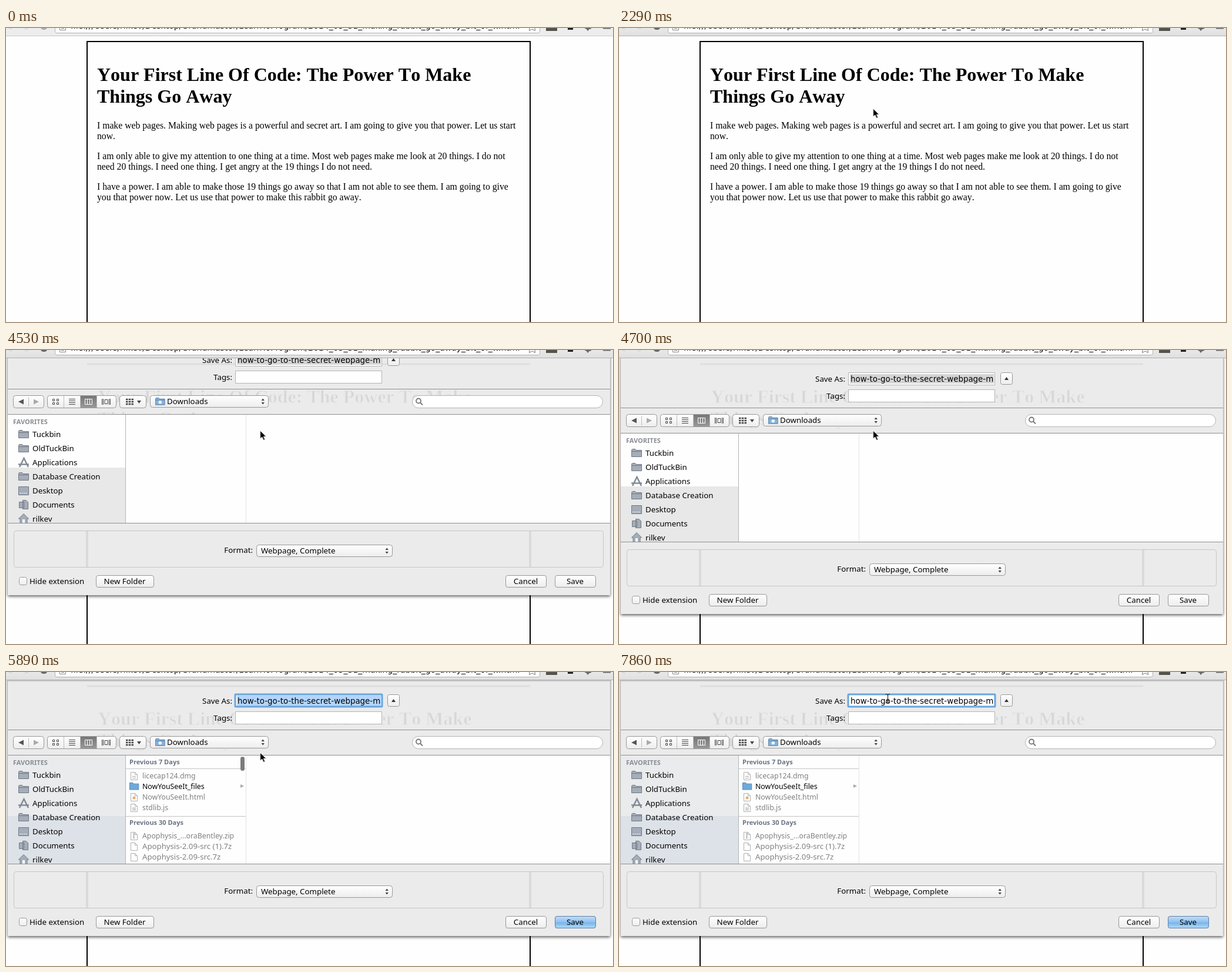
An HTML page that plays this animation: 1033 by 500 pixels, repeating every 8 s.

```html
<!DOCTYPE html>
<html lang="en">
<head>
<meta charset="utf-8">
<title>Saving a web page</title>
<style>
html, body { margin: 0; width: 100%; height: 100%; overflow: hidden; background: #fefefe; }
svg { display: block; width: 1033px; height: 500px; }
text { font: 13.3px "Noto Sans", "Open Sans", sans-serif; white-space: pre; }
.end { text-anchor: end; }
.mid { text-anchor: middle; }
.page text, .ghost text { font: 15.72px "Liberation Serif", "Times New Roman", serif; font-kerning: none; }
.page .h1, .ghost .h1 { font-size: 32px; font-weight: bold; }
.url { font: 14px "DejaVu Sans", sans-serif; }
.name { font: 13.4px "DejaVu Sans", sans-serif; }
.cap { font-size: 11px; font-weight: bold; fill: #8a8d92; }
.group { font-size: 11px; font-weight: bold; fill: #6b7482; }
.file { font-size: 12.3px; fill: #808080; }
.wide { font-size: 13.2px; }
.btn { fill: url(#face); stroke: #989898; }
.field { fill: #fff; stroke: #b4b4b4; }
.rule { stroke: #8f8f8f; }
.thin { stroke: #c4c4c4; }
.ico { fill: #a4adb8; stroke: #6f7883; }
.doc { fill: #fff; stroke: #b0b0b0; }
.ghost { fill: #d5d7d8; stroke: #ebebeb; }

/* one 8 s clock, hard cuts only */
.sheet, .ghost, .idle, .active, .list, .knob, .pulse, .sel, .caret, .arrow, .beam, .lit {
  animation: 8s step-end infinite;
}
.lit { animation-name: lit; }
.sheet { animation-name: sheet; }
.ghost { animation-name: ghost; }
.idle { animation-name: idle; }
.active { animation-name: active; }
.list { animation-name: list; }
.knob { animation-name: knob; }
.pulse { animation-name: pulse; }
.sel { animation-name: sel; }
.caret { animation-name: caret; }
.arrow { animation-name: arrow; }
.beam { animation-name: beam; }
@keyframes lit { 0% { opacity: 0 } 1.75%, 100% { opacity: 1 } }
@keyframes sheet {
  0% { transform: translateY(-480px) }
  54.75% { transform: translateY(-327px) }
  56.625% { transform: translateY(-32px) }
  58.75%, 100% { transform: none }
}
@keyframes ghost {
  0% { transform: translateY(480px) }
  54.75% { transform: translateY(327px) }
  56.625% { transform: translateY(32px) }
  58.75%, 100% { transform: none }
}
@keyframes idle { 0% { opacity: 1 } 61.75%, 100% { opacity: 0 } }
@keyframes active { 0% { opacity: 0 } 61.75%, 100% { opacity: 1 } }
@keyframes list { 0% { opacity: 0 } 66.125%, 100% { opacity: 1 } }
@keyframes knob {
  0% { opacity: 0 } 69.125% { opacity: .4 } 70.875% { opacity: .75 } 73.625% { opacity: 1 }
  79.375% { opacity: .6 } 81% { opacity: .3 } 82.5%, 100% { opacity: 0 }
}
@keyframes pulse {
  0% { opacity: 0 } 66.125% { opacity: .12 } 69.125% { opacity: .25 } 70.875% { opacity: .12 }
  73.625% { opacity: 0 } 75.75% { opacity: .1 } 79.375% { opacity: .22 } 82.5% { opacity: .1 }
  84.75% { opacity: 0 } 87.25% { opacity: .1 } 89.125% { opacity: .2 } 92.875% { opacity: .25 }
  94.625% { opacity: .12 } 98.25%, 100% { opacity: 0 }
}
@keyframes sel { 0% { opacity: 1 } 87.25%, 100% { opacity: 0 } }
@keyframes caret { 0% { opacity: 0 } 87.25% { opacity: 1 } 92.875%, 100% { opacity: 0 } }
@keyframes arrow {
  0% { transform: translate(433px, 40px); opacity: 0 }
  25% { transform: translate(433px, 40px); opacity: 1 }
  26.75% { transform: translate(430px, 135px); opacity: 1 }
  28.625% { transform: translate(432.5px, 137px); opacity: 1 }
  77.5% { transform: translate(449px, 95px); opacity: 1 }
  79.375% { transform: translate(456px, 62px); opacity: 1 }
  81%, 100% { opacity: 0 }
}
@keyframes beam {
  0% { opacity: 0 }
  81% { transform: translate(458px, 50px); opacity: 1 }
  82.5% { transform: translate(456px, 47px); opacity: 1 }
  84.75% { transform: translate(453px, 41px); opacity: 1 }
  87.25%, 100% { transform: translate(457px, 45px); opacity: 1 }
}
</style>
</head>
<body>
<svg viewBox="0 0 1033 500">
  <defs>
    <linearGradient id="face" x2="0" y2="1"><stop stop-color="#fff"/><stop offset="1" stop-color="#ededed"/></linearGradient>
    <linearGradient id="blue" x2="0" y2="1"><stop stop-color="#c3def6"/><stop offset=".5" stop-color="#8fc0ee"/><stop offset=".52" stop-color="#75b1ea"/><stop offset="1" stop-color="#aeddfb"/></linearGradient>
    <linearGradient id="dark" x2="0" y2="1"><stop stop-color="#777"/><stop offset="1" stop-color="#989898"/></linearGradient>
    <linearGradient id="bar" x2="0" y2="1"><stop stop-color="#e8e8e8"/><stop offset="1" stop-color="#e0e0e0"/></linearGradient>
    <linearGradient id="top" x2="0" y2="1"><stop stop-color="#000" stop-opacity=".22"/><stop offset="1" stop-color="#000" stop-opacity="0"/></linearGradient>
    <filter id="blur" x="-5%" y="-5%" width="110%" height="110%"><feGaussianBlur stdDeviation="2.5"/></filter>
    <clipPath id="below"><path d="M0 13.5H1033V500H0z"/></clipPath>
    <clipPath id="sheetBox"><path d="M3 13H1028V449H3z"/></clipPath>
    <clipPath id="listBox"><path d="M3 142H1028V326H3z"/></clipPath>
    <clipPath id="nameBox"><path d="M391 39H638V59H391z"/></clipPath>
    <path id="folder" class="ico" d="M.5 3.5Q.5 1.5 2.5 1.5H6.5L8 3.5H17.5V14.5H.5zM.5 5.5H17.5"/>
    <path id="sheetIcon" class="doc" d="M.5.5H7.5L11.5 4.5V13.5H.5zM7.5.5V4.5H11.5"/>
    <path id="updown" d="M0-1.5 2.7-5 5.4-1.5zM0 1.5 2.7 5 5.4 1.5z" fill="#444"/>
  </defs>

  <g class="page">
    <path d="M138 500V23H892V500" fill="none" stroke="#000" stroke-width="2"/>
    <text class="h1" x="155" y="90">Your First Line Of Code: The Power To Make</text>
    <text class="h1" x="155" y="127">Things Go Away</text>
    <text x="155" y="171">I make web pages. Making web pages is a powerful and secret art. I am going to give you that power. Let us start</text>
    <text x="155" y="189">now.</text>
    <text x="155" y="223">I am only able to give my attention to one thing at a time. Most web pages make me look at 20 things. I do not</text>
    <text x="155" y="241">need 20 things. I need one thing. I get angry at the 19 things I do not need.</text>
    <text x="155" y="275">I have a power. I am able to make those 19 things go away so that I am not able to see them. I am going to give</text>
    <text x="155" y="293">you that power now. Let us use that power to make this rabbit go away.</text>
  </g>

  <g clip-path="url(#below)">
    <g class="sheet">
      <path d="M3 0H1028V451H3z" fill="#000" opacity=".65" filter="url(#blur)"/>
      <path d="M3 0H1028V449H3z" fill="#ebebeb"/>
      <g clip-path="url(#sheetBox)">
        <g class="ghost">
          <path d="M138 24H892" style="stroke:#dedede;stroke-width:3"/>
          <text class="h1" x="156" y="90">Your First Line Of Code: The Power To Make</text>
          <text class="h1" x="156" y="127">Things Go Away</text>
        </g>
      </g>

      <!-- name and tags -->
      <text class="end" x="385" y="54">Save As:</text>
      <text class="end" x="385" y="83">Tags:</text>
      <path class="field" d="M390.500 38.500H639.500V59.500H390.500zM390.500 67.500H639.500V88.500H390.500z"/>
      <path class="idle" d="M393 41H638V57H393z" fill="#d4d4d4"/>
      <g class="active">
        <path class="sel" d="M393 40H638V58H393z" fill="#b3d5fb"/>
        <rect x="390" y="38" width="250" height="21" rx="1" fill="none" stroke="#69a5dd" stroke-width="3"/>
      </g>
      <text class="name" x="394" y="54" clip-path="url(#nameBox)">how-to-go-to-the-secret-webpage-make</text>
      <path class="caret" d="M457.500 41V57" stroke="#000"/>
      <rect class="btn" x="649.500" y="38.500" width="20" height="20" rx="3"/>
      <path d="M656 51 659.500 46 663 51z" fill="#333"/>

      <!-- browser strip -->
      <path class="rule" d="M3 98.500H1028M3 141.500H1028M3 326.500H1028"/>
      <g class="btn">
        <rect x="12.500" y="109.500" width="52" height="21" rx="4"/>
        <rect x="70.500" y="109.500" width="117" height="21" rx="4"/>
        <rect x="193.500" y="109.500" width="45" height="21" rx="4"/>
        <rect x="245.500" y="109.500" width="201" height="20" rx="4"/>
      </g>
      <path d="M127 110H154V130H127z" fill="url(#dark)"/>
      <path d="M38.500 112V128M98.500 110V130M126.500 110V130M154.500 110V130" stroke="#bbb"/>
      <path d="M30 115.500V124.500L21 120z" fill="#555"/>
      <path d="M47 115.500V124.500L56 120z" fill="#aaa"/>
      <g fill="none" stroke="#444">
        <path d="M79.500 115.500h3v3h-3zM86.500 115.500h3v3h-3zM79.500 121.500h3v3h-3zM86.500 121.500h3v3h-3z"/>
        <path d="M107 115.500H118M107 118.500H118M107 121.500H118M107 124.500H118"/>
        <path d="M134.500 115.500H146.500V124.500H134.500zM138.500 115V125M142.500 115V125" stroke="#fff"/>
        <path d="M163.500 115V125M165.500 115V125M175.500 115V125M177.500 115V125M168 116.500H173V123.500H168z"/>
        <path d="M204 116H217M204 120H217M204 124H217" stroke-width="2.500" stroke-dasharray="3.500 1.250"/>
      </g>
      <path d="M223 118H230L226.500 123z" fill="#444"/>
      <g transform="translate(254 112) scale(.92)"><use href="#folder" style="filter:hue-rotate(-5deg) saturate(4)"/><circle cx="9" cy="9.500" r="3" fill="#edf6fc"/></g>
      <text x="274" y="124">Downloads</text>
      <use href="#updown" x="434.500" y="119.500"/>
      <rect class="field" x="691.500" y="109.500" width="324" height="21" rx="10.500"/>
      <g fill="none" stroke="#777" stroke-width="1.800"><circle cx="702" cy="118.500" r="4"/><path d="M705 121.500 709 125.500"/></g>

      <!-- columns -->
      <g clip-path="url(#listBox)">
        <path d="M3 142H1028V326H3z" fill="#fefefe"/>
        <path d="M3 232H203V326H3z" fill="#e8e8e8"/>
        <g class="active">
          <path d="M3 142H203V245H3z" fill="#e9ebed"/>
          <path d="M3 245H203V326H3z" fill="#dde2e8"/>
        </g>
        <path d="M203.500 142V326" stroke="#b4b4b4"/>
        <path d="M408.500 142V326" stroke="#e4e4e4"/>
        <text class="cap" x="12" y="158">FAVORITES</text>
        <use href="#folder" x="21" y="167"/><text x="45" y="180">Tuckbin</text>
        <use href="#folder" x="21" y="191"/><text x="45" y="204">OldTuckBin</text>
        <path d="M23 231 30.500 216 38 231M21 226.500H39" fill="none" stroke="#828b96" stroke-width="2.500"/><text x="45" y="228">Applications</text>
        <use href="#folder" x="21" y="239"/><text x="45" y="252">Database Creation</text>
        <path class="ico" d="M21.500 264.500H38.500V278.500H21.500z"/><path d="M23 275.500H37" stroke="#fff" stroke-dasharray="2 1.500"/><text x="45" y="276">Desktop</text>
        <path class="ico" d="M22.500 290.500H30.500V300.500H22.500zM28.500 287.500H34L37.500 291V302.500H28.500z"/><text x="45" y="300">Documents</text>
        <path class="ico" d="M21.500 319 30 310.500 38.500 319H36V327H24V319z"/><path d="M28 320H32V327H28z" fill="#fff"/><text x="45" y="324">rilkev</text>

        <g class="list">
          <path class="thin" d="M204 164.500H408M204 245.500H408"/>
          <text class="group" x="210" y="157">Previous 7 Days</text>
          <text class="group" x="210" y="260">Previous 30 Days</text>
          <use href="#sheetIcon" x="212" y="170"/><path d="M215 177.500H221M215 180.500H221" stroke="#aaa"/>
          <g transform="translate(210 187) scale(.9)"><path d="M.5 1.500H6.500L8 3.500H17.500V14.500H.5z" fill="#6fa9d8" stroke="#4e87b6"/></g>
          <use href="#sheetIcon" x="212" y="206"/><circle cx="218" cy="214" r="2.500" fill="#e0b070"/>
          <use href="#sheetIcon" x="212" y="224"/><path d="M215 231.500H221M215 234.500H221" stroke="#888"/>
          <use href="#sheetIcon" x="212" y="272"/><path d="M217.500 274V284" stroke="#888" stroke-width="2" stroke-dasharray="1.500 1"/>
          <use href="#sheetIcon" x="212" y="290"/>
          <use href="#sheetIcon" x="212" y="308"/>
          <text class="file" x="232" y="181">licecap124.dmg</text>
          <text class="file" x="232" y="199" style="fill:#000">NowYouSeeIt_files</text>
          <text class="file" x="232" y="217">NowYouSeeIt.html</text>
          <text class="file" x="232" y="235">stdlib.js</text>
          <text class="file" x="232" y="283">Apophysis_...oraBentley.zip</text>
          <text class="file wide" x="232" y="301">Apophysis-2.09-src (1).7z</text>
          <text class="file wide" x="232" y="319">Apophysis-2.09-src.7z</text>
          <path d="M399 191 405 194 399 197z" fill="#aaa"/>
        </g>
        <rect class="knob" x="399" y="144" width="7" height="24" rx="3.500" fill="#7c7c7c"/>
      </g>

      <!-- format and buttons -->
      <path d="M138 339V402M892 339V402" stroke="#dadada" stroke-width="4"/>
      <rect x="13.500" y="339.500" width="1003" height="62" rx="4" fill="none" stroke="#c6c6c6"/>
      <text class="end" x="420" y="377">Format:</text>
      <g class="btn">
        <rect x="426.500" y="363.500" width="231" height="20" rx="4"/>
        <rect x="22.500" y="418.500" width="13" height="13" rx="3"/>
        <rect x="153.500" y="415.500" width="98" height="20" rx="3.500"/>
        <rect x="850.500" y="415.500" width="69" height="20" rx="3.500"/>
        <rect x="934.500" y="415.500" width="69" height="20" rx="3.500"/>
      </g>
      <g class="active">
        <rect x="934.500" y="415.500" width="69" height="20" rx="3.500" fill="url(#blue)" stroke="#5f7fa6"/>
        <rect class="pulse" x="935" y="416" width="68" height="19" rx="3" fill="#fff"/>
      </g>
      <text x="434" y="378">Webpage, Complete</text>
      <use href="#updown" x="645.500" y="373.500"/>
      <text x="40" y="430">Hide extension</text>
      <text class="mid" x="202" y="430">New Folder</text>
      <text class="mid" x="884.500" y="430">Cancel</text>
      <text class="mid" x="968.500" y="430">Save</text>
    </g>
    <path class="active" d="M3 14H1028V17H3z" fill="url(#top)"/>
  </g>

  <!-- browser toolbar -->
  <path d="M0 0H1033V13H0z" fill="#ededed"/>
  <path class="lit" d="M0 0H1033V13H0z" fill="url(#bar)"/>
  <path d="M0 13.500H1033" stroke="#c8c8c8"/>
  <path class="lit" d="M0 13.500H1033" stroke="#b0b0b0"/>
  <path d="M5 0 10 2M32 2 38 0" stroke="#c8c8c8"/>
  <path d="M59 0A6 5 0 0 0 70 0" fill="#aaa"/>
  <path class="lit" d="M59 0A6 5 0 0 0 70 0" fill="#666"/>
  <path d="M83.500 0V5Q83.500 8.500 87 8.500H905Q908.500 8.500 908.500 5V0" fill="#fff" stroke="#b2b2b2"/>
  <path d="M91.500 0V3.500H101.500V0M94 .5H99" fill="none" stroke="#888"/>
  <text class="url" x="110" y="1">file:///Users/rilkev/Desktop/Grandmaster/LearnToProgram/2014_03_31_making_rabbit_go_away_bit_of_w.html</text>
  <path d="M891 0 890.500 4.500 895.500 2 900.500 4.500 900 0" fill="none" stroke="#777"/>
  <path d="M919 0H938V5H919z" fill="#55524b"/>
  <path d="M956 0H965V3H956z" fill="#222"/>
  <path d="M984 0H997L994 2 992 2 991 4.500H989.500L988 2z" fill="#666"/>
  <path d="M1016 0H1029V1.500H1016z" fill="#666"/>

  <!-- pointers -->
  <path class="arrow" d="M0 0V14L3.300 11 5.800 16.500 8.300 15.400 5.900 10.200H10.200z" fill="#000" stroke="#fff" stroke-width=".9"/>
  <path class="beam" d="M-3.500-7.500Q-.5-7.500.5-6Q1.500-7.500 4-7.500M.5-6V6M-3.500 7.500Q-.5 7.500.5 6Q1.500 7.500 4 7.500M-1.500 3.500H2.500" fill="none" stroke="#222" stroke-width="1.200"/>
</svg>
</body>
</html>
```
